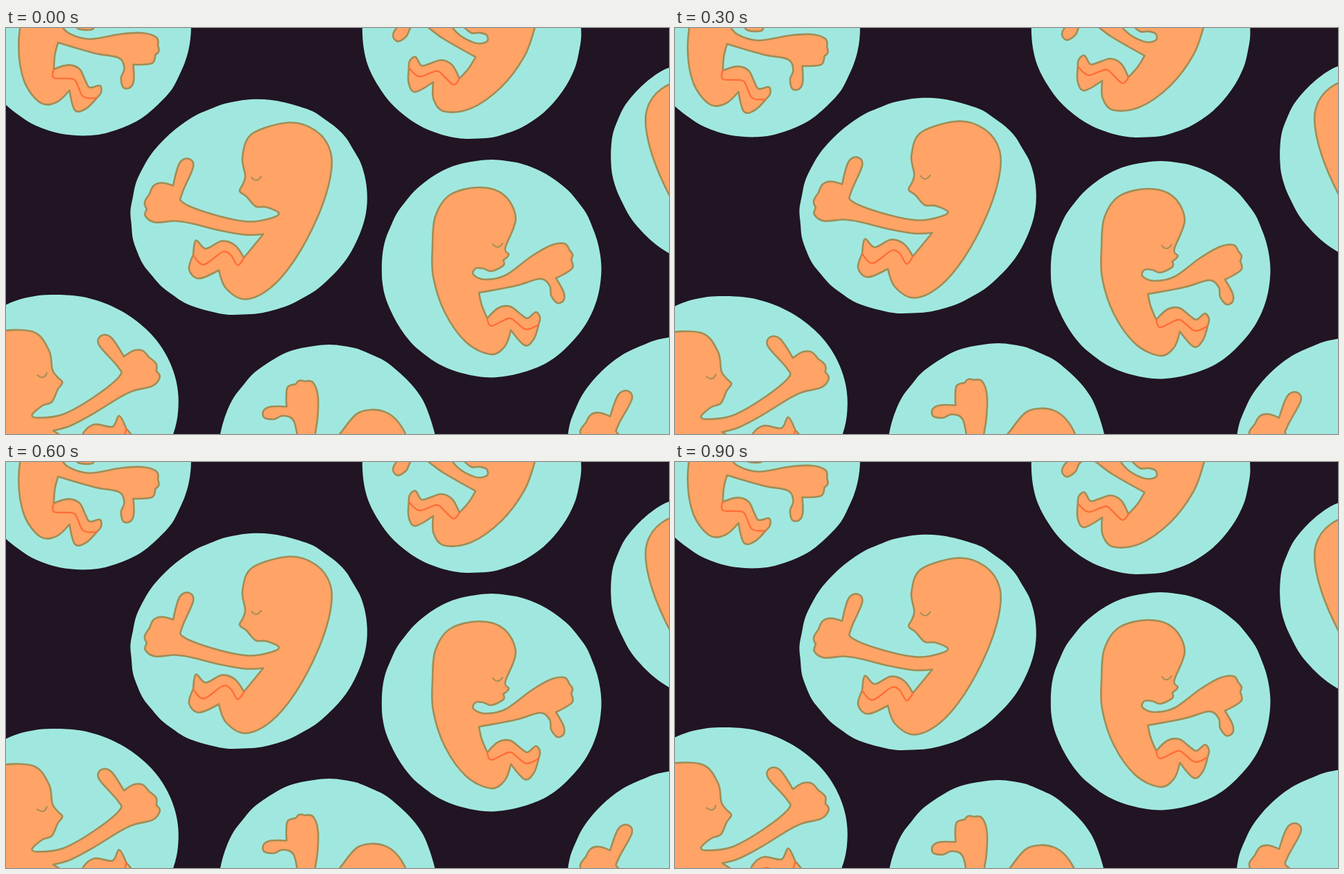
Animation of 956x586 px, one loop 1000 ms. Source, as an HTML page:

```html
<!DOCTYPE html>
<html lang="en">
<head>
<meta charset="utf-8">
<title>Floating thumbs</title>
<style>
html, body { margin: 0; width: 100%; height: 100%; overflow: hidden; background: #211423; }
svg { display: block; width: 100%; height: 100%; }
path { stroke-linecap: round; stroke-linejoin: round; }
.bubble { fill: #a0e8df; }
.skin { fill: #ffa366; stroke: #a08d56; stroke-width: 2.6; }
.eye { fill: none; stroke: #a08d56; stroke-width: 2; }
.crease { fill: none; stroke: #ff6c35; stroke-width: 2.3; }
</style>
</head>
<body>
<svg id="stage" viewBox="0 0 956 586" preserveAspectRatio="none"></svg>
<script>
const LOOP = 1000, STEP = 100, BOB_PERIOD = 1200, BOB = 2;

// Two drawings around their bubble's centre. "x,y!" is a sharp corner.
const thumbUp = {
  rx: 173, ry: 152.5, tilt: -22, eye: '4 -43',
  back: '59,-122 97,-110 118,-80 117,-40 99,15 67,75 32,116 -5,133 -33,117 -43,91!',
  leg: '-72,103 -86,90 -80,69! -76,48 -62,60 -39,49 -20,55 -7,73!',
  arm: '21,39! -5,40 -40,34 -85,23 -107,20 -135,22 -149,13 -147,3! -150,-7 -143,-19! -137,-31 -125,-35 -109,-31!',
  thumb: '-100,-63 -87,-70 -80,-58 -96,-20 -94,-6 -50,11 0,21 35,15 43,8 25,0',
  face: '10,-1 -3,-15 -13,-23 -9,-32 -5,-45 -9,-73 5,-106',
  crease: '-80,69! -65,83 -38,65 -26,69 -16,84 -7,73!'
};
const thumbDown = {
  rx: 158, ry: 157, tilt: 0, eye: '2 -35',
  face: '-18,-117 18,-106 35,-72 20,-30 25,-20 17,-12! 17,-4 0,4 -12,0 -23,0',
  arm: '-26,9 -10,16 20,10 57,-17 85,-33 105,-36 112,-27! 117,-20 115,-13! 117,-1 105,8 93,14!',
  thumb: '104,34 104,46 95,50 86,39 84,25 70,15 35,25 -18,35! -14,53 -6,72!',
  leg: '10,57 27,55 42,66 52,72 64,63 70,71 68,81! 61,102 48,111 28,89!',
  back: '19,113 -1,124 -36,107 -67,64 -84,12 -85,-32 -81,-75 -60,-106',
  crease: '-6,72! 0,83 25,72 35,77 50,88 68,81!'
};

// dx, dy shift the figure inside its bubble.
const cells = [
  { art: thumbDown, x: 109, y: -2, turn: 27, dir: 1, dx: -2 },
  { art: thumbDown, x: 671.5, y: 3, turn: 19, dir: -1, flip: true },
  { art: thumbUp, x: 350, y: 258.5, turn: 0, dir: -1 },
  { art: thumbDown, x: 700, y: 347, turn: 0, dir: 1 },
  { art: thumbUp, x: 1042, y: 198, turn: 0, dir: -1, flip: true },
  { art: thumbUp, x: 76, y: 537.5, turn: -18, dir: 1, flip: true },
  { art: thumbDown, x: 464, y: 615, turn: 61, dir: -1, flip: true, dx: -2, dy: 6 },
  { art: thumbUp, x: 980, y: 597, turn: 5, dir: 1, dx: -3, dy: 4 }
];

const stage = document.getElementById('stage');

let seed = 7;
const random = () => (seed = seed * 16807 % 2147483647) / 2147483647;

function add(parent, tag, attrs) {
  const el = document.createElementNS('http://www.w3.org/2000/svg', tag);
  for (const key in attrs) el.setAttribute(key, attrs[key]);
  return parent.appendChild(el);
}

const parse = text => text.split(' ').map(p => {
  const [x, y] = p.replace('!', '').split(',').map(Number);
  return { x, y, sharp: p.endsWith('!') };
});

// Catmull-Rom curve through the points, broken at corners.
function curve(pts, closed) {
  const n = pts.length, at = i => pts[(i + n) % n];
  const slope = (i, axis) => at(i).sharp ? 0 : (at(i + 1)[axis] - at(i - 1)[axis]) / 6;
  let d = `M${pts[0].x} ${pts[0].y}`;
  for (let i = 0; i < (closed ? n : n - 1); i++) {
    const a = at(i), b = at(i + 1);
    d += `C${a.x + slope(i, 'x')} ${a.y + slope(i, 'y')} ` +
      `${b.x - slope(i + 1, 'x')} ${b.y - slope(i + 1, 'y')} ${b.x} ${b.y}`;
  }
  return closed ? d + 'Z' : d;
}

// An ellipse with a slightly uneven, hand-cut edge.
function roughEllipse(rx, ry, count = 48) {
  return Array.from({ length: count }, (_, i) => {
    const angle = 2 * Math.PI * i / count, k = 1 + (random() - 0.5) * 0.008;
    return { x: rx * k * Math.cos(angle), y: ry * k * Math.sin(angle) };
  });
}

function build({ art, x, y, turn, flip, dx = 0, dy = 0 }) {
  const group = add(stage, 'g', {});
  const pose = (px, py) => `translate(${px} ${py}) rotate(${turn}) scale(${flip ? -1 : 1} 1)`;
  add(group, 'path', {
    class: 'bubble', d: curve(roughEllipse(art.rx, art.ry), true),
    transform: `${pose(x, y)} rotate(${art.tilt})`
  });
  const figure = add(group, 'g', { transform: pose(x + dx, y + dy) });
  const parts = art === thumbUp
    ? [art.back, art.leg, art.arm, art.thumb, art.face]
    : [art.face, art.arm, art.thumb, art.leg, art.back];
  add(figure, 'path', { class: 'skin', d: curve(parse(parts.join(' ')), true) });
  add(figure, 'path', { class: 'crease', d: curve(parse(art.crease)) });
  add(figure, 'path', { class: 'eye', d: `M${art.eye}q7 9 14 -1` });
  return group;
}

const groups = cells.map(build);

// Neighbours bob in opposite directions; the loop cuts the swing short.
function render(time) {
  const t = Math.floor((time % LOOP) / STEP) * STEP;
  const y = BOB * Math.sin(2 * Math.PI * t / BOB_PERIOD);
  groups.forEach((group, i) => group.setAttribute('transform', `translate(0 ${cells[i].dir * y})`));
}

const start = performance.now();
function tick() {
  render(performance.now() - start);
  requestAnimationFrame(tick);
}
tick();
</script>
</body>
</html>
```
